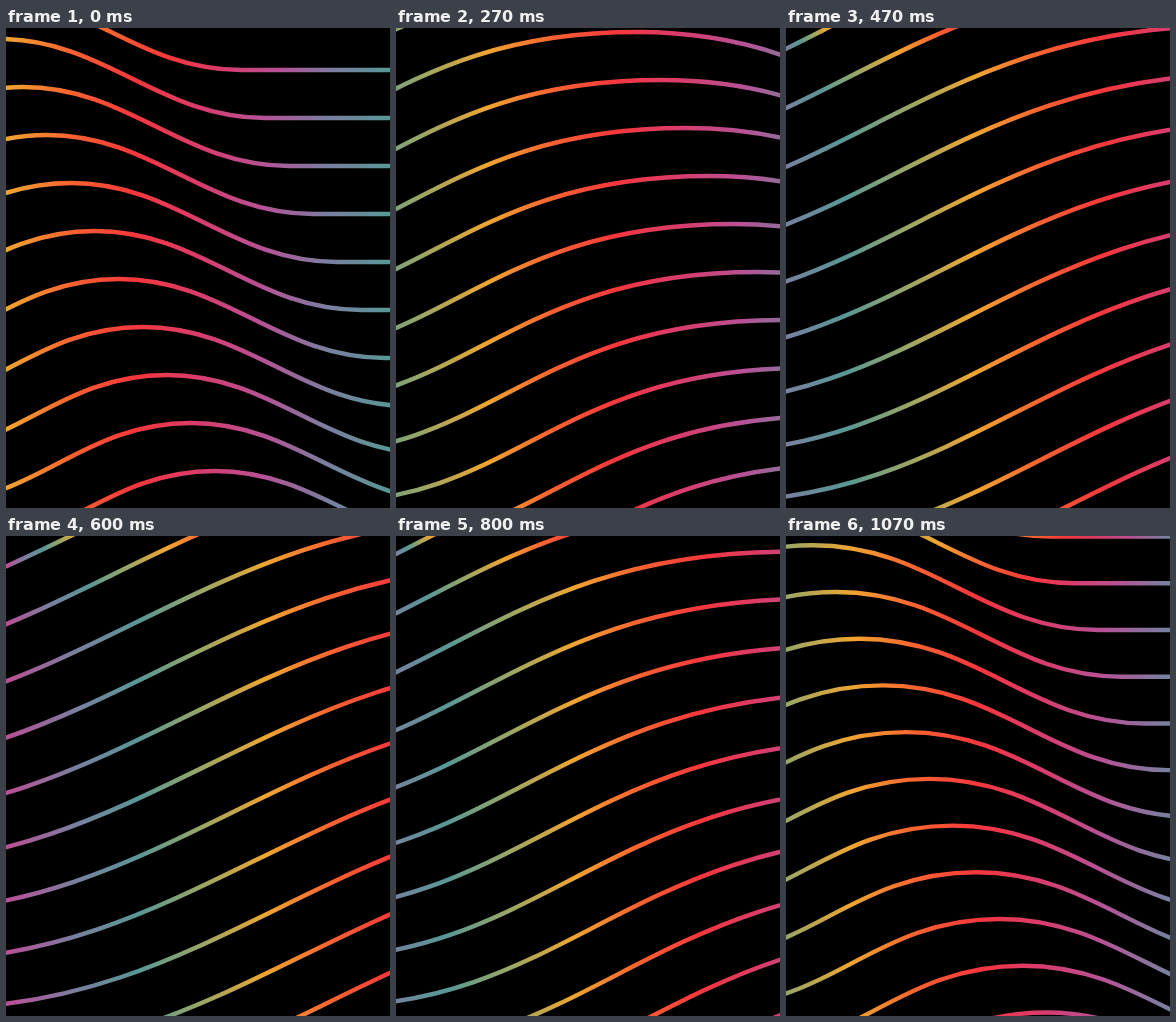
An HTML page with a canvas that plays this animation: 384 by 480 pixels, repeating every 1140 ms.

```html
<!DOCTYPE html>
<html lang="en">
<head>
<meta charset="utf-8">
<title>Rainbow waves</title>
<style>
  html, body { margin: 0; width: 100%; height: 100%; overflow: hidden; background: #000; }
  canvas { display: block; width: 384px; height: 480px; }
</style>
</head>
<body>
<canvas id="stage" width="384" height="480"></canvas>
<script>
const W = 384, H = 480;
const ctx = document.getElementById('stage').getContext('2d');

const LOOP = 1140, TURN = 600, STEP = 200 / 3;
const GAP_X = 24, GAP_Y = 48;
const TROUGH = { x: -263, y: 90 };
const TOP_EDGE = -22;

// The crest travels along these points and back again
const CREST = [
  { t: 0, x: -7, y: 11 },
  { t: 133, x: 22, y: 3 },
  { t: 267, x: 218, y: -44 },
  { t: 400, x: 347, y: -84 },
  { t: 600, x: 456, y: -117 }
];

// Evenly spaced around one colour cycle, measured in line lengths
const COLORS = ['#f0a532', '#f86430', '#f6373c', '#d93c6c', '#b65296', '#7a7fa0', '#589896', '#9ba764'];
const PERIOD = 1.34;

// Smooth curve through the crest points, at rest at both ends
function crestAt(t, axis) {
  const slope = i => {
    const a = CREST[i - 1], b = CREST[i + 1];
    return a && b ? (b[axis] - a[axis]) / (b.t - a.t) : 0;
  };
  const i = Math.max(1, CREST.findIndex(p => p.t >= t));
  const a = CREST[i - 1], b = CREST[i];
  const d = b.t - a.t, u = (t - a.t) / d;
  return cubic(a[axis], a[axis] + slope(i - 1) * d / 3, b[axis] - slope(i) * d / 3, b[axis], u);
}

function cubic(a, b, c, d, t) {
  const u = 1 - t;
  return u * u * u * a + 3 * u * u * t * b + 3 * u * t * t * c + t * t * t * d;
}

// x where a curve from trough to crest reaches height y
function crossing(xs, crestY, y) {
  let lo = 0, hi = 1;
  for (let n = 0; n < 24; n++) {
    const mid = (lo + hi) / 2;
    if (cubic(TROUGH.y, TROUGH.y, crestY, crestY, mid) > y) lo = mid;
    else hi = mid;
  }
  return cubic(...xs, lo);
}

function waveAt(time) {
  const t = time <= TURN ? time : 2 * TURN - time;
  const x = crestAt(t, 'x'), y = crestAt(t, 'y');
  const rise = (CREST[0].y - y) / 128;
  const bulge = .09 * Math.sin(Math.PI * rise);
  const left = x - TROUGH.x;
  const right = (TROUGH.y - y) / .297;
  return {
    y,
    up: [TROUGH.x, TROUGH.x + left * .395, x - left * (.43 + bulge), x],
    down: [x + right, x + right * .6, x + right * (.4 + bulge), x]
  };
}

// Each gradient spans only the part of its line below the top edge
function colorSpan(wave, dx, dy) {
  const edge = TOP_EDGE - dy;
  if (wave.y >= edge) return [0, W];
  const exit = crossing(wave.up, wave.y, edge) + dx;
  if (exit > 0) return [0, Math.min(W, exit)];
  const entry = crossing(wave.down, wave.y, edge) + dx;
  return [Math.max(0, Math.min(W - 1, entry)), W];
}

// Two full colour cycles, so that the visible part is always covered
function rainbow(from, to, phase) {
  const at = p => from + (to - from) * p;
  const paint = ctx.createLinearGradient(at(phase - PERIOD), 0, at(phase + PERIOD), 0);
  const count = 2 * COLORS.length;
  for (let n = 0; n <= count; n++) paint.addColorStop(n / count, COLORS[n % COLORS.length]);
  return paint;
}

function strokeLine(wave, row, phase) {
  const dx = row * GAP_X, dy = row * GAP_Y;
  const { up, down, y } = wave;
  const [from, to] = colorSpan(wave, dx, dy);

  ctx.save();
  ctx.translate(dx, dy);
  ctx.beginPath();
  ctx.moveTo(-900, TROUGH.y);
  ctx.lineTo(up[0], TROUGH.y);
  ctx.bezierCurveTo(up[1], TROUGH.y, up[2], y, up[3], y);
  ctx.bezierCurveTo(down[2], y, down[1], TROUGH.y, down[0], TROUGH.y);
  ctx.lineTo(1800, TROUGH.y);
  ctx.strokeStyle = rainbow(from - dx, to - dx, phase);
  ctx.stroke();
  ctx.restore();
}

// Colours ease away from rest and return at a nearly even pace
function phaseAt(time) {
  const out = time <= TURN;
  const u = (out ? time : 2 * TURN - time) / TURN;
  return .68 * Math.pow(u, out ? 1.3 : .95);
}

// Poses change 15 times a second, on whole hundredths
function heldTime(time) {
  let tick = Math.ceil(time / STEP);
  while (Math.round(tick * STEP / 10) * 10 > time) tick--;
  return tick * STEP;
}

function draw(time) {
  const wave = waveAt(time), phase = phaseAt(time);
  const zoom = 1 - 4e-5 * Math.max(0, time - 400);

  ctx.setTransform(1, 0, 0, 1, 0, 0);
  ctx.fillStyle = '#000';
  ctx.fillRect(0, 0, W, H);
  ctx.translate(W / 2, H / 2);
  ctx.scale(zoom, zoom);
  ctx.translate(-W / 2, -H / 2);
  ctx.lineWidth = 4.5;
  for (let row = -3; row <= 11; row++) strokeLine(wave, row, phase);
}

const start = performance.now();
function loop() {
  draw(heldTime((performance.now() - start) % LOOP));
  requestAnimationFrame(loop);
}
loop();
</script>
</body>
</html>
```
